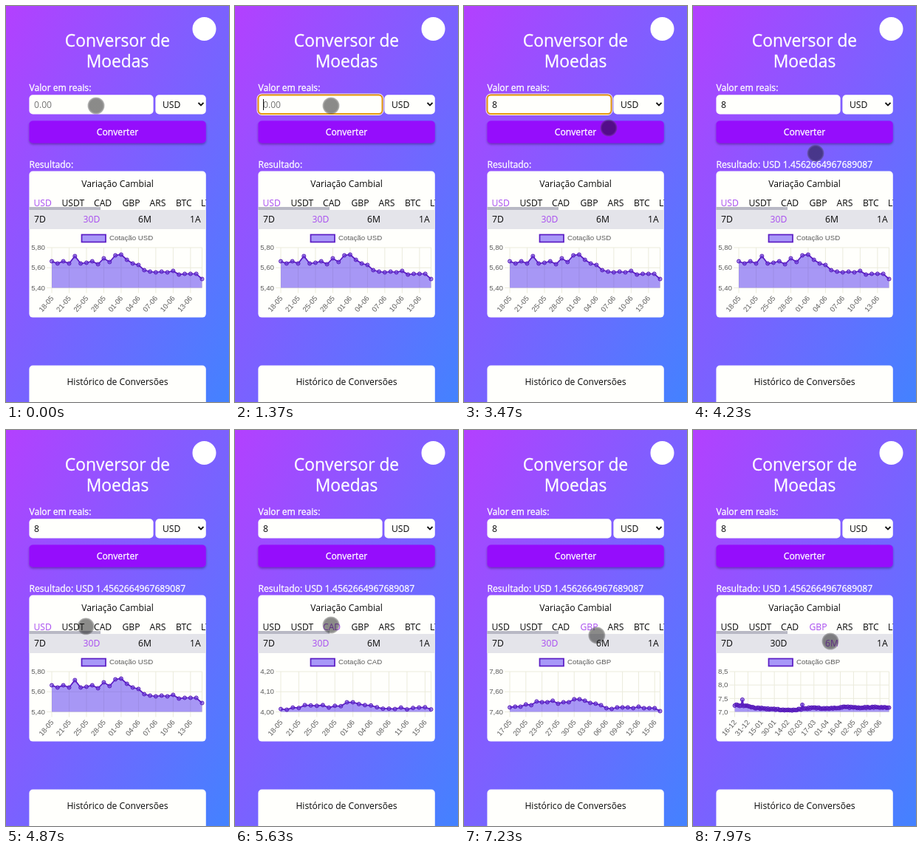
An HTML page for the animation above (8000 ms loop, 302x536 px).

```html
<!DOCTYPE html>
<html lang="pt-BR">
<head>
<meta charset="utf-8">
<title>Conversor de Moedas</title>
<style>
  html, body { margin: 0; width: 100%; height: 100%; overflow: hidden; }
  body { background: linear-gradient(to bottom right, #b340ff, #4382ff); }
  svg { display: block; width: 302px; height: 536px; }
  text { font: 12.15px "Open Sans", "Noto Sans", sans-serif; fill: #080808; }
  .light { fill: #fff; stroke: #fff; stroke-width: .3; }
  .title { font-size: 22.8px; }
  .mid { text-anchor: middle; }
  .panel { fill: #fffffc; }
  #plot text { font: 9.7px "Liberation Sans", Arial, sans-serif; fill: #5c5c5c; }
  .grid { stroke: #ebebdc; fill: none; }
</style>
</head>
<body>
<svg viewBox="0 0 302 536">
  <defs>
    <clipPath id="card"><rect x="31.4" y="223.6" width="239.4" height="198" rx="5"/></clipPath>
    <radialGradient id="touch">
      <stop offset=".78" stop-color="#0c0c0c" stop-opacity=".48"/>
      <stop offset=".9" stop-color="#333" stop-opacity=".45"/>
      <stop offset="1" stop-color="#555" stop-opacity=".36"/>
    </radialGradient>
    <filter id="shade" x="-10%" y="-30%" width="120%" height="180%">
      <feDropShadow dx="0" dy="2" stdDeviation="1.6" flood-color="#200050" flood-opacity=".4"/>
    </filter>
  </defs>

  <circle cx="268.5" cy="31" r="16" fill="#fff"/>
  <text class="light title mid" x="151" y="55">Conversor de</text>
  <text class="light title mid" x="151" y="83">Moedas</text>

  <text class="light" x="31.5" y="115">Valor em reais:</text>
  <rect class="panel" x="31.4" y="120.2" width="168.2" height="26.3" rx="5"/>
  <g id="focus" fill="none">
    <rect x="30" y="119" width="171" height="28.5" rx="6" stroke="#fff"/>
    <rect x="31.5" y="120.5" width="168" height="25.5" rx="5" stroke="#e59a0c" stroke-width="2"/>
  </g>
  <text id="value" x="38" y="137.5"></text>
  <rect id="caret" x="38" y="126" width="1" height="15" fill="#111"/>
  <rect class="panel" x="202.4" y="120.2" width="68.4" height="26.3" rx="5"/>
  <text x="212" y="137.5">USD</text>
  <path d="M260.5 131l3.5 3.5l3.5-3.5" fill="none" stroke="#111" stroke-width="1.8"/>

  <rect x="31.4" y="155.4" width="239.4" height="30" rx="5" fill="#950cfc" filter="url(#shade)"/>
  <text class="light mid" x="151" y="174.8">Converter</text>
  <text class="light" id="result" x="31.5" y="219"></text>

  <rect class="panel" x="31.4" y="223.6" width="239.4" height="198" rx="5"/>
  <text class="mid" x="151" y="245">Variação Cambial</text>
  <g clip-path="url(#card)">
    <g id="tabs"></g>
    <rect x="31" y="272" width="97" height="4" fill="#b8b8c4"/>
    <rect x="31" y="276" width="240" height="26" fill="#e4e4ea"/>
    <g id="spans"></g>
  </g>
  <g id="plot"></g>

  <rect class="panel" x="31.4" y="486.5" width="239.4" height="70" rx="5"/>
  <text class="mid" x="151" y="513">Histórico de Conversões</text>
  <circle id="cursor" r="11.5" fill="url(#touch)"/>
</svg>

<script>
const LOOP = 8000, BASE = 381.5, TOP = 327, RIGHT = 265.5;
const FOCUS = 370, TYPE = 1970, BLUR = 3520, RESULT = 3900;
const $ = id => document.getElementById(id);
const rows = s => s.split(' ');

// Heights above the baseline for the 30-day series
const usd = [36,33,36,33,43,33,34,36,32,40,35,44,45,38,33,31,24,22,21,22,21,23,18,19,19,19,12];
const cad = [8,6,12,11,19,18,17,19,12,17,16,27,27,22,19,18,13,9,9,8,12,7,11,12,13,7];
const gbp = [6,7,7,10,9,14,13,13,15,11,13,13,17,17,15,12,11,9,5,4,6,6,6,5,7,5,5,5,1].map(h => h * 1.7);

// Half-year series: coarse trend plus seeded jitter
function halfYear() {
  const trend = [9, 8, 5, 4, 3, 2, 3.5, 5.5, 4.5, 5, 6.5, 5.5, 6, 6.5, 5];
  const n = 122;
  let seed = 11;
  const out = [];
  for (let i = 0; i < n; i++) {
    const p = i / (n - 1) * (trend.length - 1.001), k = Math.floor(p);
    seed = (seed * 1103 + 377) % 4096;
    const h = trend[k] + (trend[k + 1] - trend[k]) * (p - k) + (seed / 4096 - .5) * 1.6;
    out.push(h * 3.2);
  }
  out[6] = 52;
  out[53] = 30;
  return out;
}

const charts = [
  { at: -2000, name: 'USD', left: 62, data: usd, ticks: rows('5,80 5,60 5,40'), step: 3,
    days: rows('18-05 21-05 25-05 28-05 01-06 04-06 07-06 10-06 13-06') },
  { at: 5480, name: 'CAD', left: 62, data: cad, ticks: rows('4,20 4,10 4,00'), step: 3,
    days: rows('18-05 21-05 25-05 28-05 01-06 04-06 08-06 11-06 15-06') },
  { at: 7030, name: 'GBP', left: 62, data: gbp, ticks: rows('7,80 7,60 7,40'), step: 3,
    days: rows('17-05 20-05 23-05 27-05 30-05 03-06 06-06 09-06 12-06 15-06') },
  { at: 7880, name: 'GBP', left: 56.5, data: halfYear(), ticks: rows('8,5 8,0 7,5 7,0'), step: 10.35,
    days: rows('16-12 31-12 15-01 30-01 14-02 02-03 17-03 01-04 16-04 02-05 20-05 06-06') }
];

// time, x, y
const path = [
  [0, 122, 135], [330, 130, 135], [2150, 130, 135], [2950, 196, 165], [3800, 196, 165],
  [4900, 108, 266], [5250, 130, 264], [6450, 130, 264], [6750, 170, 265], [7000, 170, 265],
  [7400, 186, 286], [LOOP, 186, 286]
];

function menu(id, y, items) {
  $(id).innerHTML = items.map(([s, x]) => `<text x="${x}" y="${y}">${s}</text>`).join('');
}
menu('tabs', 271, [['USD', 37.5], ['USDT', 75.5], ['CAD', 119], ['GBP', 157.5],
  ['ARS', 194.5], ['BTC', 230], ['LTC', 264]]);
menu('spans', 293.3, [['7D', 38], ['30D', 104.5], ['6M', 179], ['1A', 249]]);

function pick(id, index) {
  [...$(id).children].forEach((el, i) => el.style.fill = i === index ? '#a84cf0' : '');
}

function frame(c) {
  let s = '';
  c.ticks.forEach((label, i) => {
    const y = TOP + (BASE - TOP) * i / (c.ticks.length - 1);
    s += `<path class="grid" d="M${c.left - 7} ${y}H${RIGHT}"/>` +
      `<text x="${c.left - 9}" y="${y + 3.2}" text-anchor="end">${label}</text>`;
  });
  c.days.forEach((label, i) => {
    const x = c.left + (RIGHT - c.left) * i * c.step / (c.data.length - 1);
    s += `<path class="grid" d="M${x} ${TOP}V${BASE + 7}"/>` +
      `<text transform="translate(${x + .3} 393.7) rotate(-50)" y="3.4" text-anchor="end">${label}</text>`;
  });
  return s + `<path class="grid" d="M${RIGHT} ${TOP}V${BASE}"/>` +
    '<rect x="102.5" y="309.5" width="32.5" height="10" fill="#a898f8" stroke="#5a1cc4" stroke-width="1.7"/>' +
    `<text x="140" y="317.4">Cotação ${c.name}</text>` +
    '<path id="area" fill="#5030f0" fill-opacity=".5"/>' +
    '<path id="line" fill="none" stroke="#5a1cc4" stroke-width="1.7"/>' +
    '<path id="dots" fill="#6a3ce0" fill-opacity=".55" stroke="#5618b8"/>';
}

let shown = null, grown = -1;
function drawChart(t) {
  const c = charts.filter(c => c.at <= t).pop();
  if (c !== shown) {
    $('plot').innerHTML = frame(c);
    shown = c;
    grown = -1;
  }
  const grow = 1 - (1 - Math.min(1, (t - c.at) / 1000)) ** 4;
  if (grow === grown) return;
  grown = grow;
  const pts = c.data.map((h, i) => [
    (c.left + (RIGHT - c.left) * i / (c.data.length - 1)).toFixed(2),
    (BASE - h * grow).toFixed(2)
  ]);
  const line = 'M' + pts.map(p => p.join(' ')).join('L');
  $('line').setAttribute('d', line);
  $('area').setAttribute('d', `${line}V${BASE}H${c.left}Z`);
  $('dots').setAttribute('d', pts.map(([x, y]) =>
    `M${x - 2.5} ${y}a2.5 2.5 0 1 0 5 0a2.5 2.5 0 1 0 -5 0`).join(''));
}

function moveCursor(t) {
  const i = path.findIndex(p => p[0] > t);
  const [t0, x0, y0] = path[i - 1], [t1, x1, y1] = path[i];
  const p = (t - t0) / (t1 - t0), e = p * p * (3 - 2 * p);
  $('cursor').setAttribute('cx', x0 + (x1 - x0) * e);
  $('cursor').setAttribute('cy', y0 + (y1 - y0) * e);
}

function drawForm(t) {
  const typed = t >= TYPE, focused = t >= FOCUS && t < BLUR;
  const blink = Math.floor((t - (typed ? TYPE : FOCUS)) / 500) % 2 === 0;
  $('value').textContent = typed ? '8' : '0.00';
  $('value').style.fill = typed ? '' : '#757575';
  $('focus').style.opacity = focused ? 1 : 0;
  $('caret').style.opacity = focused && blink ? 1 : 0;
  $('caret').setAttribute('x', typed ? 45 : 38);
  $('result').textContent = 'Resultado:' + (t >= RESULT ? ' USD 1.4562664967689087' : '');
  pick('tabs', t < 5320 ? 0 : t < 6850 ? 2 : 3);
  pick('spans', t < 7650 ? 1 : 2);
}

function tick() {
  const t = performance.now() % LOOP;
  drawForm(t);
  drawChart(t);
  moveCursor(t);
  requestAnimationFrame(tick);
}
tick();
</script>
</body>
</html>
```
